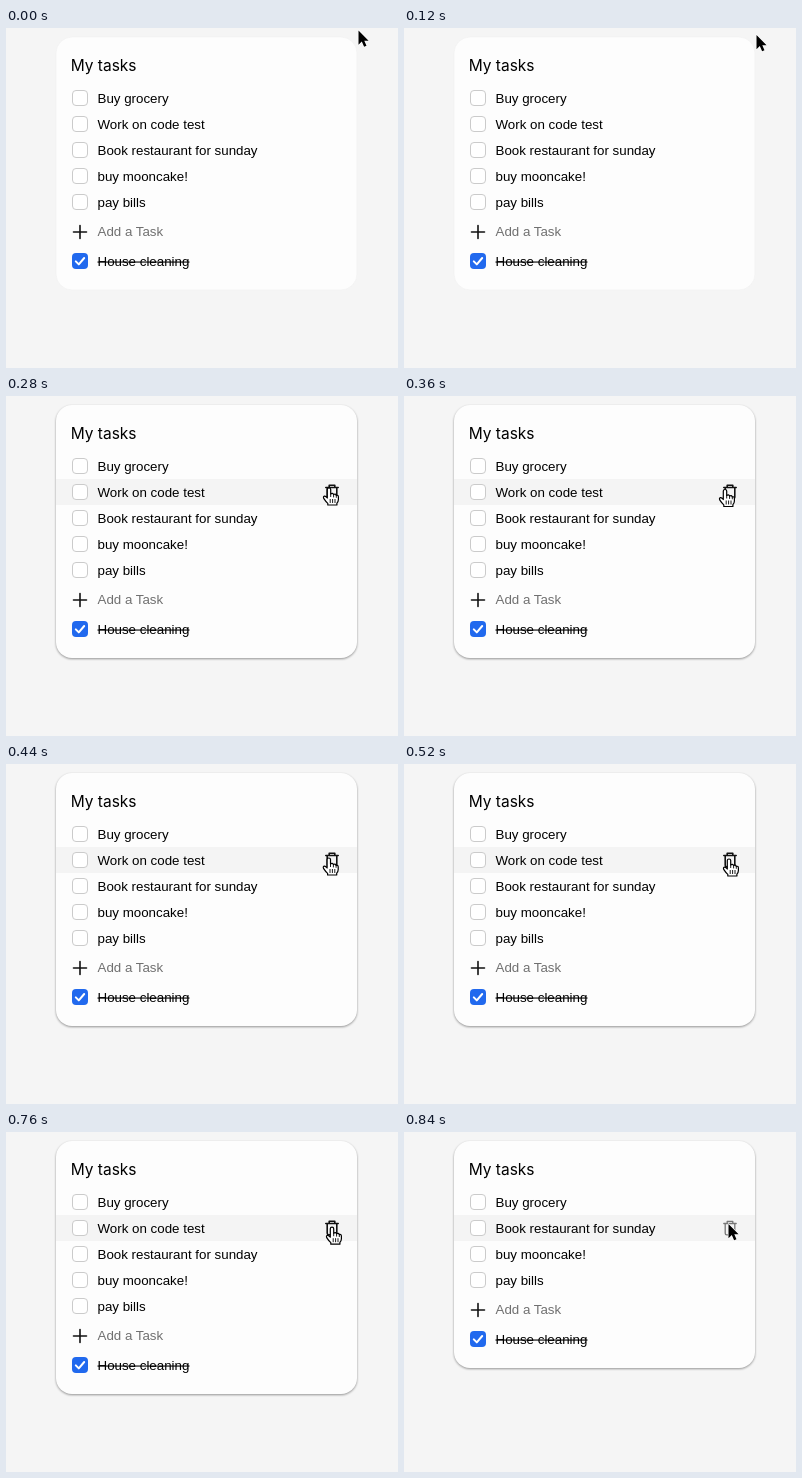
These frames come from a looping animation (392 px wide and 340 px high, 1.04 s). An HTML page:

```html
<!DOCTYPE html>
<html lang="en">
<head>
<meta charset="utf-8">
<title>My tasks</title>
<style>
  html, body { margin: 0; width: 100%; height: 100%; overflow: hidden; background: #f5f5f5; }
  svg { display: block; }
  text { font: 13.333px "Liberation Sans", Arial, sans-serif; }
  .title { font: 15.5px Inter, Roboto, sans-serif; }
  .card { fill: #fdfdfd; stroke: #f0f0f0; stroke-width: .6; }
  .card.raised { stroke: none; filter: drop-shadow(0 1px 1.2px rgba(0, 0, 0, .4)); }
  .box { fill: #fff; stroke: #cbcbcb; }
  .hover { fill: #f4f4f4; }
  .line { fill: none; stroke-linecap: round; stroke-linejoin: round; }
  .bin { stroke: #777; stroke-width: 1.3; }
  .bin.hot { stroke: #111; stroke-width: 1.6; }
</style>
</head>
<body>
<svg id="stage" width="392" height="340" viewBox="0 0 392 340">
  <rect id="card" class="card" x="50" y="9" width="301" rx="16"/>
  <rect id="hover" class="hover" x="50" width="301" height="26"/>
  <text class="title" x="64.7" y="43">My tasks</text>
  <g id="list"></g>
  <g id="foot">
    <path class="line" d="M67.5 204H80.5M74 197.5V210.5" stroke="#111" stroke-width="1.6"/>
    <text x="91.5" y="208" fill="#707070">Add a Task</text>
    <rect x="66" y="225" width="16" height="16" rx="4" fill="#2169ee"/>
    <path class="line" d="M69.8 233.4L72.8 236.4L78.2 230" stroke="#fff" stroke-width="2"/>
    <text x="91.5" y="238">House cleaning</text>
    <rect x="91.5" y="233.5" width="92" height="1.1"/>
  </g>
  <g id="bin" class="line bin">
    <path d="M319.8 -4.5H332.2M323.2 -4.7V-6.7H328.8V-4.7"/>
    <path d="M321.2 -4.3V5.2Q321.2 6.8 322.8 6.8H329.2Q330.8 6.8 330.8 5.2V-4.3"/>
  </g>
  <path id="arrow" d="M0 0V14.2L3.3 11.1L5.6 16.3L8 15.2L5.8 10.2H10.1Z"
        fill="#000" stroke="#fff" stroke-width="1.2" stroke-linejoin="round" paint-order="stroke"/>
  <g id="hand">
    <path d="M-1.7 10V1.6Q-1.7 0 0 0Q1.7 0 1.7 1.6V6Q3.6 4.6 4.6 6.6Q6.4 5.4 7.3 7.4Q9.4 6.8 9.4 9V11.6Q9.4 13.6 7.9 15.2V17H-1.2V15.4Q-3.4 13.4 -5.3 10.4Q-6 8.6 -4.6 8.1Q-3.2 7.9 -1.7 10Z"
          fill="#fff" stroke="#000" stroke-width="1.2" stroke-linejoin="round"/>
    <path class="line" d="M1.7 6V8.6M4.6 6.8V9M7.3 7.6V9.4M1.2 11.4V14.6M3.6 11.4V14.6M6 11.4V14.6"
          stroke="#000" stroke-width=".9"/>
  </g>
</svg>
<script>
const LOOP = 1040, ROW = 26, FIRST = 70;
const tasks = ["Buy grocery", "Work on code test", "Book restaurant for sunday", "buy mooncake!", "pay bills"];
const $ = id => document.getElementById(id);

// time, cursor x, cursor y, cursor shape
const steps = [
  [0, 352.5, 2.5, "arrow"],
  [40, 352.6, 3.2, "arrow"],
  [80, 352.7, 4.6, "arrow"],
  [120, 352.5, 7, "arrow"],
  [160, 347, 38, "arrow"],
  [200, 337, 70.5, "arrow"],
  [240, 329.5, 85, "arrow"],
  [280, 323, 92, "hand"],
  [320, 321.3, 93.4, "hand"],
  [360, 321, 93.5, "hand"],
  [440, 322.8, 94, "hand"],
  [480, 324.2, 94.6, "hand"],
  [520, 325, 95, "hand"],
  [560, 325.6, 95, "hand"],
  [640, 325.8, 95, "hand"],
  [680, 326, 95.2, "hand"],
  [800, 325, 93, "arrow"],
  [840, 324.5, 92, "arrow"]
];
const RAISE = 160, DELETE = 800, GONE = 1;

const rows = tasks.map(name => {
  const g = document.createElementNS("http://www.w3.org/2000/svg", "g");
  g.innerHTML = `<rect class="box" x="66.5" y="-7.5" width="15" height="15" rx="3.5"/><text x="91.5" y="5">${name}</text>`;
  $("list").append(g);
  return g;
});

const show = (el, on) => el.style.display = on ? "" : "none";
const move = (el, x, y) => el.setAttribute("transform", `translate(${x} ${y})`);

function draw(t) {
  const [, x, y, shape] = steps.findLast(s => s[0] <= t);
  const raised = t >= RAISE, deleted = t >= DELETE;
  const shift = deleted ? ROW : 0;

  $("card").classList.toggle("raised", raised);
  $("card").setAttribute("height", 253 - shift);
  rows.forEach((row, i) => {
    show(row, !(deleted && i === GONE));
    move(row, 0, FIRST + i * ROW - (i > GONE ? shift : 0));
  });
  move($("foot"), 0, -shift);

  const over = Math.floor((y - FIRST + ROW / 2) / ROW);
  const active = raised && over >= 0;
  const mid = FIRST + over * ROW;
  show($("hover"), active);
  show($("bin"), active);
  $("hover").setAttribute("y", mid - ROW / 2);
  move($("bin"), 0, mid);
  $("bin").classList.toggle("hot", shape === "hand");

  for (const id of ["arrow", "hand"]) {
    show($(id), id === shape);
    move($(id), x, y);
  }
}

const start = performance.now();
function tick() {
  draw((performance.now() - start) % LOOP);
  requestAnimationFrame(tick);
}
tick();
</script>
</body>
</html>
```
